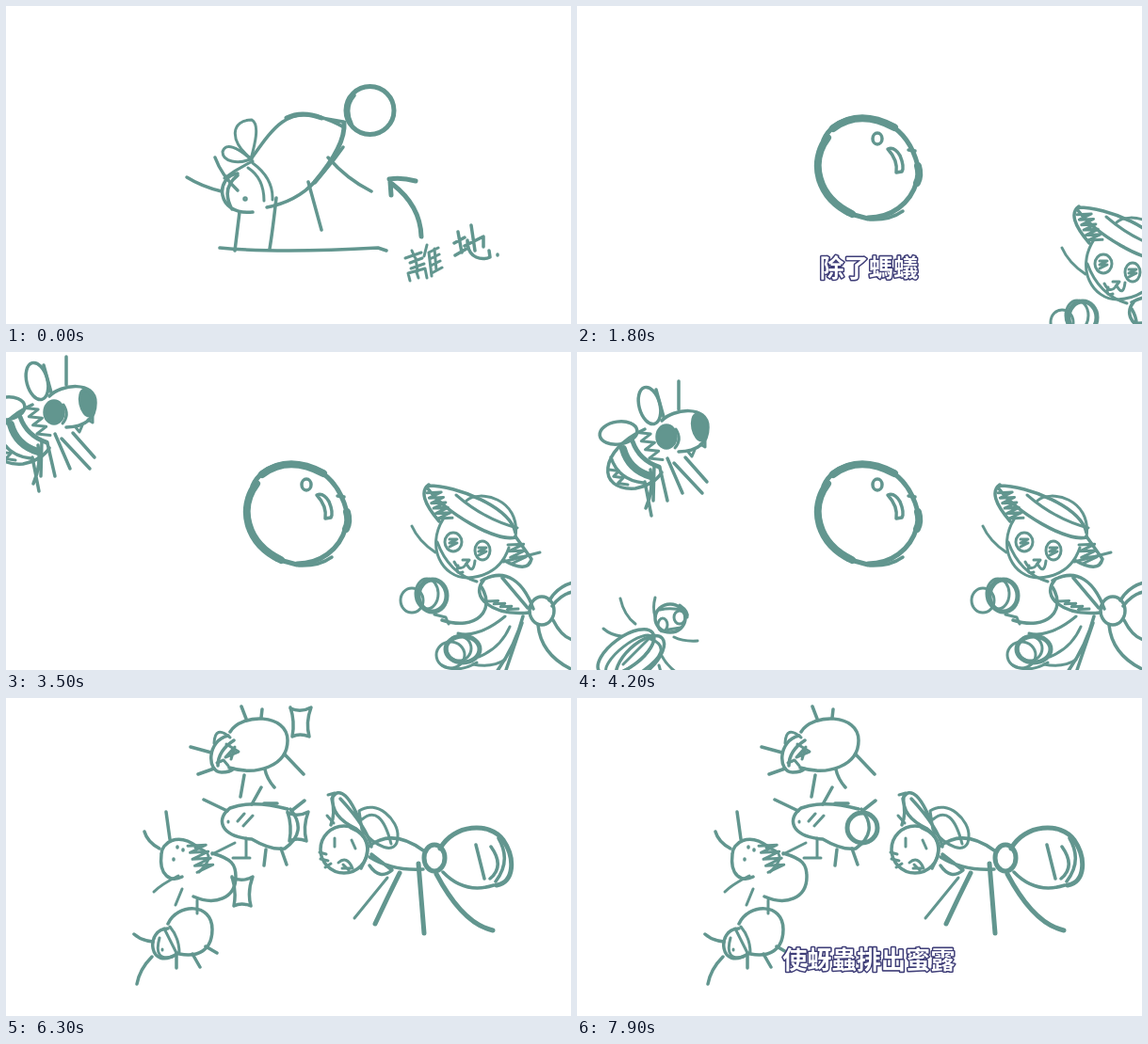
Recreate the animation shown at these times as an HTML page. Size 600 px wide and 338 px high, loop 8 s.

```html
<!DOCTYPE html>
<html lang="zh-Hant">
<head>
<meta charset="utf-8">
<style>
html, body { margin: 0; width: 100%; height: 100%; overflow: hidden; background: #fff; }
svg { display: block; width: 100vw; height: 100vh; }
.ink { fill: none; stroke: #62968f; stroke-width: 3.5; stroke-linecap: round; stroke-linejoin: round; }
.thin { stroke-width: 3; }
.bold { stroke-width: 5; }
.heavy { stroke-width: 8; }
.solid { fill: #62968f; }
text {
  font: 700 26px "Noto Sans CJK TC", "Noto Sans CJK", "Noto Sans CJK JP", sans-serif;
  letter-spacing: .18px; text-anchor: middle;
  fill: #fff; stroke: #3f3e78; stroke-width: 3px; stroke-linejoin: round; paint-order: stroke;
}
</style>
</head>
<body>
<svg viewBox="0 0 600 338">
<g class="ink" id="stage">
  <g id="aphid">
    <path d="M192 182Q208 192 229 197M222 161Q229 180 246 196"/>
    <path class="thin" d="M232 183Q245 173 262 165M257 172Q274 183 274 207M262 167Q284 183 283 206"/>
    <path d="M246 178C222 181 222 223 262 219M246 180Q228 194 240 216"/>
    <circle class="solid" cx="254" cy="205" r="1"/>
    <path class="thin" d="M261 163C235 142 240 121 261 121C270 126 264 148 260 163C247 151 233 144 230 155C230 166 247 168 259 163"/>
    <path d="M260 163C282 132 298 106 335 119L358 123M330 117Q345 121 359 129"/>
    <path class="bold" d="M298 119Q314 111 335 119M359 124Q361 148 328 187"/>
    <path d="M328 187Q308 208 277 214M358 150Q340 176 318 196"/>
    <path d="M342 161Q362 184 388 197M321 187L335 238M248 219L243 260M287 204Q283 240 280 258"/>
  </g>
  <g id="note">
    <circle class="bold" cx="386.5" cy="111" r="25.5"/>
    <path d="M370 95Q359 108 367 125M227 257Q290 263 395 257L404 260"/>
    <path class="bold" d="M441 245Q440 212 410 189M407 184Q420 182 435 186M408 187L409 201"/>
    <path class="thin" d="M424 268L441 262M431 260L434 267M429 273L442 268M430 279L444 274M435 268L437 282M429 292L427 284L445 279L447 289M436 283L438 289"/>
    <path class="thin" d="M447 254L444 266M449 262L452 287M449 262L459 257M450 269L460 264M451 276L461 271M452 284L463 278M455 258L457 281"/>
    <path d="M476 252L487 246M480 240L484 262M477 265L489 258M487 255L507 245V256M494 233L498 260M490 249C490 270 507 270 514 267L513 260M522 264V265"/>
  </g>
  <g id="flight">
    <circle class="bold" cx="521" cy="36" r="25"/>
    <path class="thin" d="M386 118Q420 94 452 75M430 104L484 64"/>
  </g>
  <g id="drop">
    <path class="heavy" d="M266 140C247 165 254 203 292 221M272 130Q300 109 337 129"/>
    <path class="bold" d="M262 142Q270 125 290 120M330 125Q354 138 362 170M361 186C354 211 333 225 309 225M287 220L309 226"/>
    <path class="heavy" d="M362 170Q365 180 361 188"/>
    <path d="M311 227Q332 228 346 218M352 153L359 154"/>
    <ellipse cx="319" cy="141" rx="5" ry="6"/>
    <path d="M330 152Q337 149 343 159Q348 171 345 176L339 177Q341 164 330 152Z"/>
  </g>
  <g id="ant">
    <path d="M448 142C480 142 535 165 541 192M449 141Q435 151 460 180M447 144C468 172 520 202 541 197"/>
    <path class="thin" d="M489 158C502 146 547 155 541 197M478 152Q508 178 543 187"/>
    <path d="M541 196L558 220Q554 236 528 221"/>
    <path class="thin" d="M528 223L567 213M431 185Q438 201 456 213M458 202Q470 235 500 244"/>
    <path class="thin" d="M464 178C446 207 463 240 490 240Q524 238 534 208"/>
    <ellipse class="thin" cx="475" cy="202" rx="9" ry="10"/>
    <ellipse class="thin" cx="506" cy="211" rx="8" ry="10"/>
    <path class="thin" d="M476 223Q482 235 489 225Q496 238 498 222M485 221L492 221L488 226M480 227Q477 237 485 234"/>
    <path d="M505 243C531 228 550 245 560 273M507 243C493 259 514 281 556 277M527 240L554 272"/>
    <ellipse cx="569" cy="275" rx="13" ry="15"/>
    <path d="M577 264Q586 249 602 245M580 270Q590 257 602 255M581 285Q590 303 602 306M565 290Q568 322 602 338"/>
    <path d="M549 281Q541 312 521 340M548 288L531 338M505 250C520 274 500 297 463 285"/>
    <path class="thin" d="M530 281Q502 304 480 299M535 292Q525 315 502 324M496 332Q516 336 530 327"/>
    <ellipse class="bold" cx="453" cy="259" rx="15" ry="17"/>
    <ellipse class="thin" cx="447" cy="257" rx="12" ry="16"/>
    <ellipse class="thin" cx="431" cy="264" rx="12" ry="13"/>
    <path class="thin" d="M455 279L467 282L470 289M463 333Q480 342 500 330"/>
    <ellipse class="bold" cx="485" cy="316" rx="18" ry="14"/>
    <circle class="thin" cx="481" cy="315" r="13"/>
    <ellipse class="thin" cx="472" cy="322" rx="15" ry="14"/>
  </g>
  <g id="bee">
    <ellipse cx="44" cy="86" rx="20" ry="12" transform="rotate(-8 44 86)"/>
    <ellipse cx="77" cy="57" rx="11" ry="20" transform="rotate(-15 77 57)"/>
    <path d="M108 31L108 61M84 40L92 69"/>
    <path d="M90 73C102 60 139 56 139 80Q139 105 108 106"/>
    <ellipse class="solid" cx="130" cy="80" rx="7" ry="14" transform="rotate(-12 130 80)"/>
    <ellipse class="solid" cx="95" cy="90" rx="10" ry="12"/>
    <path class="thin" d="M105 82Q112 93 104 102M118 106L122 111L125 104M131 98L136 101V93"/>
    <path d="M72 82C23 104 20 148 62 145Q82 141 90 128M36 112Q44 136 70 139"/>
    <path class="heavy" d="M49 103Q55 125 78 132"/>
    <path class="bold" d="M59 95Q66 115 87 122"/>
    <path d="M72 138L79 174M78 125Q82 146 73 166M82 120L81 158M88 123L96 158M96 113L112 150M103 118L133 150M115 112L138 138"/>
  </g>
  <g id="fly">
    <path class="thin" d="M73 261Q81 268 92 269M91 229Q95 247 107 256M128 228Q125 239 128 248"/>
    <ellipse cx="144" cy="250" rx="16" ry="15"/>
    <ellipse class="thin" cx="136" cy="257" rx="5" ry="7"/>
    <ellipse class="thin" cx="154" cy="249" rx="6" ry="7"/>
    <path class="thin" d="M133 241Q146 238 158 242M154 236Q164 243 162 249M142 262L155 260"/>
    <ellipse cx="97" cy="286" rx="35" ry="16" transform="rotate(-36 97 286)"/>
    <ellipse class="thin" cx="101" cy="289" rx="31" ry="11" transform="rotate(-38 101 289)"/>
    <ellipse cx="112" cy="293" rx="32" ry="15" transform="rotate(-43 112 293)"/>
    <path class="thin" d="M124 269L94 299M123 272Q150 282 112 308M148 270Q158 275 173 274M135 290Q143 305 160 313M132 300L140 328"/>
  </g>
  <g id="dragonfly">
    <path class="thin" d="M434 42Q453 13 471 41M457 20Q471 28 478 39"/>
    <circle cx="486" cy="50" r="14"/>
    <circle class="thin" cx="488" cy="49" r="8"/>
    <path class="thin" d="M482 47L490 44L486 52L494 50M497 38Q524 42 508 70L490 69"/>
    <path d="M472 -2Q481 20 497 34Q500 13 508 -2"/>
    <path d="M547 -2Q565 30 573 45Q577 73 568 88C558 103 535 88 510 70"/>
    <path class="bold" d="M513 69Q543 100 566 86"/>
    <path class="thin" d="M510 65L552 47Q566 60 572 78M555 -2Q545 40 558 53M517 66Q540 86 568 61M513 18L543 45"/>
    <path class="thin" d="M484 65Q475 91 463 122M490 68L478 116M497 72L502 121M503 72L523 123M512 69L536 111"/>
  </g>
  <g id="herd">
    <g id="topAphid">
      <path d="M238 36C250 16 299 16 299 45C299 72 267 83 237 74M236 40C213 45 213 79 229 79Q238 79 242 75M242 45Q225 56 225 72"/>
      <path class="thin" d="M221 48Q222 28 238 42M234 49L247 57L233 63L243 52L239 65M224 69L231 66L236 72"/>
      <path d="M196 52L218 58M204 81L221 75M250 9L255 22M272 12L271 21M296 60L316 81M275 76Q277 86 285 95M253 82L249 105"/>
    </g>
    <g id="middleAphid">
      <path d="M238 117Q262 108 299 118M238 117C223 128 226 147 261 150Q281 162 296 160M302 118Q321 142 296 160"/>
      <path d="M210 108L235 120M271 95L261 113M317 109L303 120M274 112H288M276 161L274 178M292 160L298 177"/>
      <path class="thin" d="M246 131L253 123M252 136L262 125M236 131V132M255 149V169M241 170H259"/>
    </g>
    <g id="thirdAphid">
      <path d="M203 158C182 142 165 154 165 166C162 189 175 196 187 190M219 165C240 171 244 177 244 190C244 213 222 221 199 211"/>
      <path d="M147 142Q150 153 163 160M170 121L174 150M182 158V159M178 171V172M188 161V162"/>
      <path class="thin" d="M201 159Q227 164 205 185M219 166L243 154M183 189Q165 198 157 206M187 203L180 220M203 215V229"/>
    </g>
    <g id="bottomAphid">
      <path d="M172 240C182 218 219 217 219 246C219 268 204 276 184 272M172 245C147 245 151 293 183 271"/>
      <path class="thin" d="M168 245L181 271M174 243Q184 255 184 271M163 255Q156 280 177 275M166 267V268"/>
      <path d="M136 251Q144 258 156 259M155 275Q142 288 139 304M181 273V287M198 272L206 286M212 264L224 271"/>
    </g>
  </g>
  <g id="keeper">
    <circle cx="359" cy="161" r="25"/>
    <path d="M366 138Q395 150 377 181"/>
    <path class="thin" d="M333 164L340 166M334 171L342 173M339 180L345 176M349 149V158M367 151L371 160"/>
    <path class="thin" d="M353 175Q362 167 368 181L357 181M358 177L364 183M342 103L349 101M341 125L348 133"/>
    <path d="M345 135Q350 123 346 107C353 93 366 101 380 143M347 104Q344 126 372 139M355 107Q383 137 388 158"/>
    <path class="thin" d="M375 120C394 107 417 130 416 147C416 170 390 157 378 140ZM378 129Q398 112 409 155"/>
    <path d="M385 158Q410 138 443 162M443 182Q410 184 386 169M386 178Q397 194 410 183L388 166"/>
    <ellipse class="bold" cx="455" cy="170" rx="11" ry="14"/>
    <path class="bold" d="M461 160C475 134 514 131 528 151C541 170 540 196 521 199"/>
    <path d="M464 185Q487 209 518 199M523 149Q537 173 520 195M499 156L508 192M515 158Q530 179 514 192"/>
    <path class="thin" d="M405 191L370 234"/>
    <path class="bold" d="M418 186Q405 212 392 240M438 176L444 250M457 187Q485 240 517 247"/>
  </g>
  <g id="bead"><circle class="bold" cx="303" cy="138"/></g>
</g>
<text id="caption" x="310" y="288"></text>
</svg>
<script>
const stage = document.getElementById('stage');
const caption = document.getElementById('caption');
const parts = Object.fromEntries([...stage.children].map(g => [g.id, g]));
const bead = parts.bead.firstElementChild;

function addPath(parent, d, className = '') {
  const path = document.createElementNS('http://www.w3.org/2000/svg', 'path');
  path.setAttribute('d', d);
  path.setAttribute('class', className);
  return parent.appendChild(path);
}

// Zigzag shading along a line.
function scribble(parent, x, y, dx, dy, reach, turns) {
  let d = '';
  for (let i = 0; i <= turns; i++) {
    const k = i / turns, side = i % 2 ? reach : -reach;
    d += `${i ? 'L' : 'M'}${x + dx * k + side} ${y + dy * k - side / 4}`;
  }
  addPath(parent, d, 'thin');
}
scribble(parts.ant, 454, 148, 13, 30, 7, 11);
scribble(parts.ant, 541, 203, 4, 20, 8, 6);
scribble(parts.ant, 515, 264, 25, 10, 4, 7);
scribble(parts.ant, 475, 198, 0, 8, 4, 4);
scribble(parts.ant, 506, 207, 0, 8, 4, 4);
scribble(parts.bee, 70, 84, 15, 32, 6, 7);
scribble(parts.bee, 38, 124, 12, 18, 4, 5);
scribble(parts.dragonfly, 485, 1, 10, 25, 10, 9);
scribble(parts.dragonfly, 500, 46, 6, 20, 6, 5);
scribble(parts.herd, 202, 155, 10, 28, 9, 8);

function sparkle([x, y]) {
  const g = document.createElementNS('http://www.w3.org/2000/svg', 'g');
  addPath(g, `M${x} ${y + 1}q11 5 22 -1q-6 16 -2 31q-10 -4 -18 0q3 -16 -2 -31z`);
  return stage.appendChild(g);
}
const sparkles = [[302, 10], [299, 121], [240, 190], [220, 245], [331, 32]].map(sparkle);

const twinkles = [[6300, '012'], [6500, '034'], [6700, '012'], [6900, '034'],
  [7000, '023'], [7100, '014'], [7200, '012'], [7700, '12'], [7800, '2'], [7900, '']];
const captions = [[0, ''], [1600, '除了螞蟻'], [3100, ''], [4500, '蜜露也獲得許多昆蟲的喜愛'],
  [6300, ''], [6700, '因此螞蟻會輕拍蚜蟲腹部'], [7700, '使蚜蟲排出蜜露']];

const latest = (keys, t) => keys.reduce((v, [start, value]) => t >= start ? value : v, '');

function show(part, visible, dx = 0, dy = 0) {
  part.style.display = visible ? '' : 'none';
  part.setAttribute('transform', `translate(${dx} ${dy})`);
}

const stepsLeft = (t, end) => Math.max(0, (end - t) / 100);
// Some insects pause one step short before settling.
const approach = (t, settle) => t >= settle ? 0 : Math.max(1, stepsLeft(t, settle - 100));

function render(time) {
  const t = Math.floor(time / 100) * 100;
  const within = (a, b) => t >= a && t < b;
  const launched = t >= 500;
  show(parts.aphid, t < 1000, launched ? 4 : 0, launched ? -11 : 0);
  show(parts.note, !launched);
  show(parts.flight, within(500, 1000));
  show(parts.drop, within(1000, 6300));

  const antSteps = stepsLeft(t, 2100);
  show(parts.ant, within(1600, 6300), antSteps * 28, antSteps * 24);
  const beeSteps = approach(t, 3800);
  show(parts.bee, within(3100, 6300), beeSteps * -22, beeSteps * -13);
  const flySteps = approach(t, 4500);
  show(parts.fly, within(3600, 6300), flySteps * -22.5, flySteps * 16.5);
  const dragonSteps = stepsLeft(t, 5100);
  show(parts.dragonfly, within(4500, 6300), dragonSteps * 20, dragonSteps * -19);

  show(parts.herd, t >= 6300);
  show(parts.keeper, t >= 6300);
  const lit = latest(twinkles, t);
  sparkles.forEach((s, i) => show(s, lit.includes(i)));
  show(parts.bead, t >= 7700);
  bead.setAttribute('r', Math.max(0, Math.min(16, 6 + (t - 7700) / 20)));
  caption.textContent = latest(captions, t);
}

const began = performance.now();
function tick() {
  render((performance.now() - began) % 8000);
  requestAnimationFrame(tick);
}
tick();
</script>
</body>
</html>
```
